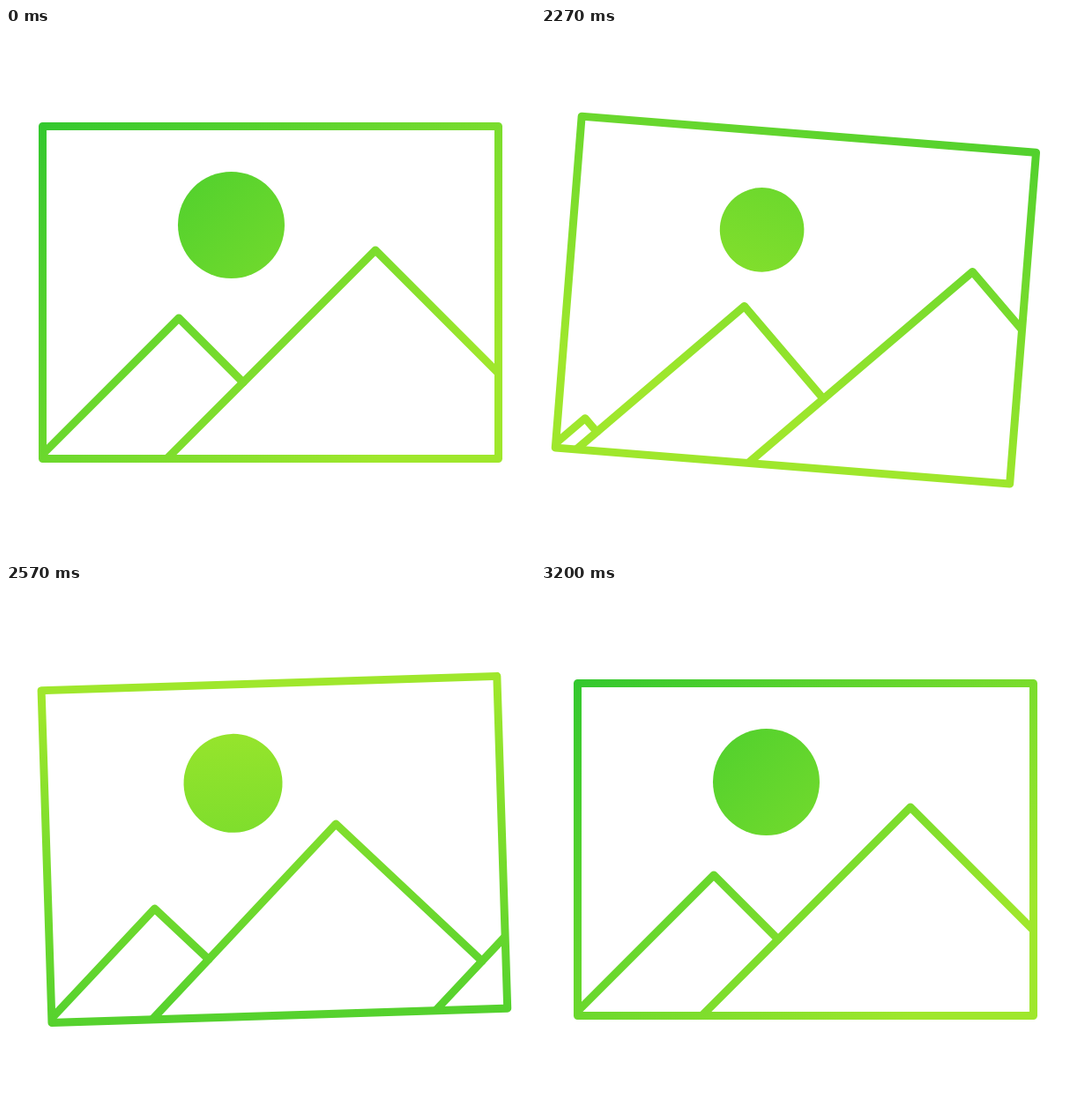
An HTML page with a canvas for the animation above (3.23 s loop, 600 px wide and 600 px high).

```html
<!DOCTYPE html>
<html lang="en">
<head>
<meta charset="utf-8">
<title>Swinging picture</title>
<style>
  html, body { margin: 0; width: 100%; height: 100%; overflow: hidden; background: #fff; }
  canvas { display: block; width: 600px; height: 600px; }
</style>
</head>
<body>
<canvas id="stage" width="600" height="600"></canvas>
<script>
const ctx = document.getElementById('stage').getContext('2d');

const LOOP = 3230, REST = 2000, STEP = 30, STEPS = 40;
const FRAME = { x: 41.5, y: 111.5, w: 517, h: 377 };
const PIVOT = { x: 300, y: 160 };
const SUN = { x: 255.5, y: 223.5, r: 60.5 };

const mix = (a, b, p) => a + (b - a) * p;
const smooth = s => s * s * (3 - 2 * s);

// Cubic bezier easing with control points (x1, 0) and (x2, 1).
function bezier(x1, x2) {
  return u => {
    if (u <= 0) return 0;
    if (u >= 1) return 1;
    let lo = 0, hi = 1;
    for (let i = 0; i < 30; i++) {
      const s = (lo + hi) / 2, r = 1 - s;
      const x = 3 * x1 * s * r * r + 3 * x2 * s * s * r + s * s * s;
      if (x < u) lo = s; else hi = s;
    }
    return smooth(lo);
  };
}

// Value at a step, from [step, value, easing] keys.
function track(keys, step) {
  for (let i = 1; i < keys.length; i++) {
    const [a, from] = keys[i - 1], [b, to, ease = smooth] = keys[i];
    if (step <= b) return mix(from, to, ease((step - a) / (b - a)));
  }
  return keys[keys.length - 1][1];
}

const slide = bezier(0.4, 0.13);
const climb = bezier(0.32, 0.27);
const turn = bezier(0.33, 0.43);
const swing = [[0, 0], [3, -1.5], [10, 4.9], [20, -2], [28, 0.8], [40, 0]];
const drop = [[0, 0], [6, 12.3], [15, 0]];
const sunScale = [[0, 1], [5.5, 0.784], [40, 1, slide]];

function gradient(step) {
  const angle = (-133 + 360 * turn(step / STEPS)) * Math.PI / 180;
  const c = Math.cos(angle), s = Math.sin(angle), x = 371, y = 294;
  const g = ctx.createLinearGradient(x + 393 * c, y + 393 * s, x - 177 * c, y - 177 * s);
  g.addColorStop(0, '#2dc62e');
  g.addColorStop(1, '#9fe72c');
  return g;
}

// Mountains have 45 degree slopes around a peak at x with height h;
// the right slope stops at the neighbour in front.
function mountains(u) {
  const p = slide(u);
  const list = [
    { x: mix(-1.5, 154.5, p), h: mix(3.5, 159.5, p) },
    { x: mix(154.5, 377.5, p), h: mix(159.5, 236.5, climb(u)) },
    { x: mix(377.5, 753.5, p), h: 236.5 }
  ];
  const bottom = FRAME.y + FRAME.h;
  list.forEach(({ x, h }, i) => {
    if (h < 4 || x - h >= FRAME.w) return;
    const next = list[i + 1];
    const limit = next ? next.x - next.h : Infinity;
    const foot = Math.min(FRAME.w, (x + h + limit) / 2);
    ctx.beginPath();
    ctx.moveTo(FRAME.x + x - h, bottom);
    ctx.lineTo(FRAME.x + x, bottom - h);
    if (foot > x) ctx.lineTo(FRAME.x + foot, bottom - (x + h - foot));
    ctx.stroke();
  });
}

// Shapes are built in the tilted space but painted with an upright gradient.
function draw(step) {
  ctx.setTransform(1, 0, 0, 1, 0, 0);
  ctx.globalCompositeOperation = 'source-over';
  ctx.clearRect(0, 0, 600, 600);

  ctx.translate(PIVOT.x, PIVOT.y + track(drop, step));
  ctx.rotate(track(swing, step) * Math.PI / 180);
  ctx.translate(-PIVOT.x, -PIVOT.y);
  ctx.fillStyle = ctx.strokeStyle = '#000';
  ctx.lineWidth = 9;
  ctx.lineJoin = ctx.lineCap = 'round';

  ctx.beginPath();
  ctx.arc(SUN.x, SUN.y, SUN.r * track(sunScale, step), 0, 2 * Math.PI);
  ctx.fill();

  ctx.save();
  ctx.beginPath();
  ctx.rect(FRAME.x, FRAME.y, FRAME.w, FRAME.h);
  ctx.clip();
  mountains(step / STEPS);
  ctx.restore();
  ctx.strokeRect(FRAME.x, FRAME.y, FRAME.w, FRAME.h);

  ctx.setTransform(1, 0, 0, 1, 0, 0);
  ctx.globalCompositeOperation = 'source-in';
  ctx.fillStyle = gradient(step);
  ctx.fillRect(0, 0, 600, 600);
}

const start = performance.now();
function tick() {
  const t = (performance.now() - start) % LOOP;
  draw(Math.min(STEPS, Math.max(0, Math.floor((t - REST) / STEP))));
  requestAnimationFrame(tick);
}
tick();
</script>
</body>
</html>
```
